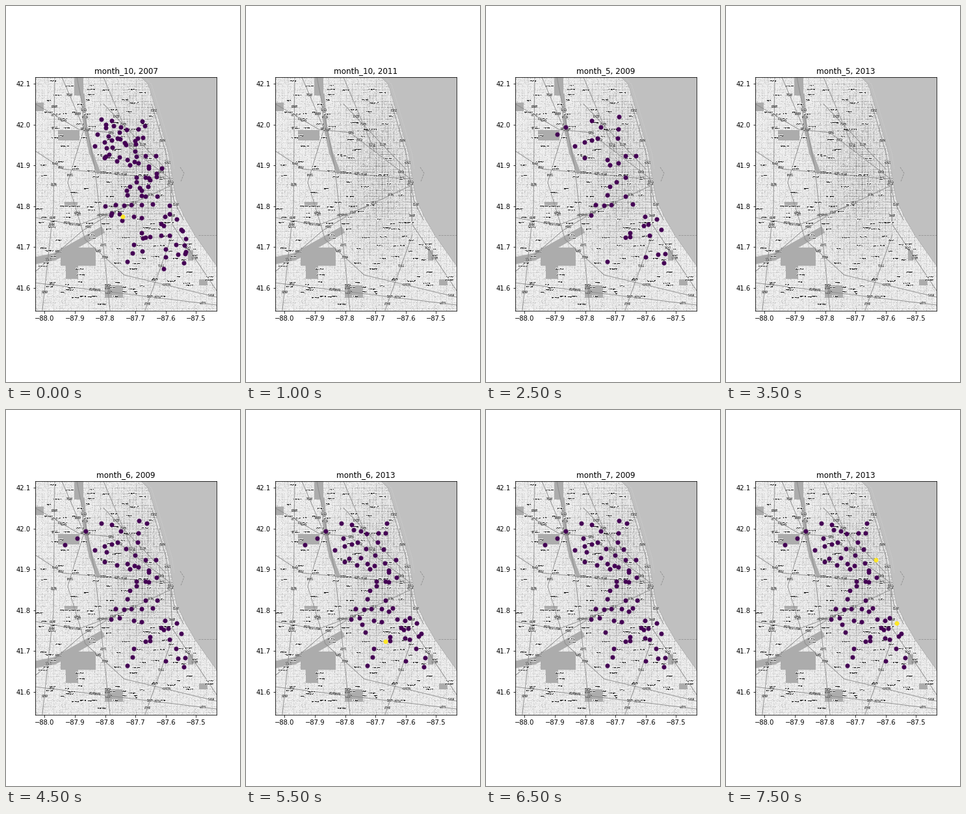
Write a matplotlib script that moves like this. It is 360 by 576 pixels and loops after 8 s.

```python
import numpy as np
import matplotlib.pyplot as plt
from matplotlib.animation import FuncAnimation
from matplotlib.patches import Polygon
from matplotlib.ticker import MultipleLocator

W, H, DPI = 360, 576, 72
LEFT, TOP, WIDE, TALL = 45, 109, 279, 357.6
WEST, EAST, SOUTH, NORTH = -88.031, -87.432, 41.544, 42.116
PURPLE, YELLOW = "#440154", "#fde725"
YEARS = (2007, 2009, 2011, 2013)

# Trap sites in stage pixels, grouped by the survey that first lists them.
MAY_09 = [
    (205, 170), (204, 241), (215, 230), (265, 381), (152, 209), (231, 230),
    (222, 354), (187, 290), (201, 270), (182, 306), (163, 176), (177, 186),
    (204, 189), (203, 203), (172, 203), (163, 206), (137, 215), (152, 233),
    (187, 236), (191, 244), (215, 263), (191, 277), (215, 292), (169, 305),
    (193, 305), (226, 304), (162, 321), (245, 323), (263, 327), (243, 337),
    (270, 343), (252, 352), (215, 355), (246, 385), (276, 380), (187, 392),
    (274, 394), (123, 186), (110, 197), (250, 335), (222, 348)]
JUN_09 = [
    (155, 218), (233, 292), (147, 174), (220, 246), (220, 249), (220, 264),
    (185, 213), (199, 223), (171, 238), (198, 239), (232, 257), (201, 263),
    (209, 305), (175, 319), (197, 323), (209, 325), (239, 334), (197, 366),
    (195, 379), (262, 366), (217, 174), (91, 207)]
JUL_09 = [
    (150, 197), (212, 214), (177, 227), (220, 309), (184, 341), (245, 350)]
NEW_13 = [
    (166, 184), (186, 190), (159, 228), (179, 329), (252, 319),
    (215, 189), (214, 235), (233, 321), (266, 347)]
ONLY_07 = [
    (154, 182), (141, 197), (214, 184), (222, 267), (240, 249), (154, 231),
    (210, 376), (209, 348), (154, 187), (175, 194), (158, 200), (210, 177),
    (211, 202), (176, 204), (183, 210), (199, 207), (200, 212), (164, 217),
    (175, 232), (201, 231), (232, 262), (206, 279), (219, 277), (186, 283),
    (209, 283), (209, 291), (153, 307), (252, 306), (163, 318), (180, 323),
    (272, 345), (277, 357), (211, 356), (239, 352), (275, 367), (246, 373),
    (277, 377), (243, 403)]


def without(sites, gone):
    return [s for s in sites if s not in gone]


def within(sites, x_max, y_max):
    return [(x, y) for x, y in sites if x <= x_max and y <= y_max]


by_june = MAY_09 + JUN_09
by_july = by_june + JUL_09
gone_07 = MAY_09[:1] + MAY_09[-4:] + JUN_09[-2:] + JUL_09
all_07 = without(by_july, gone_07) + NEW_13[:5] + ONLY_07
all_11 = without(by_july, MAY_09[:4] + JUN_09[:2])
all_13 = all_11 + NEW_13
first_07 = ONLY_07[:8] + MAY_09[4:10] + JUN_09[2:6]
june_07 = [s for i, s in enumerate(within(all_07, 246, 392)) if i % 4 != 2]

# Sites per month, one list for each year.
SURVEYS = {
    10: (all_07, within(by_july, 265, 385), [], []),
    5: (first_07, MAY_09, [], []),
    6: (june_07, by_june, all_11, all_13),
    7: (without(all_07, ONLY_07[::6]), by_july, all_11 + NEW_13[::2], all_13),
}
POSITIVE = {
    (10, 2007): [(180, 323)],
    (6, 2013): [(215, 355)],
    (7, 2013): [(231, 230), (263, 327)],
}
SCENES = [(month, year) for month in SURVEYS for year in YEARS]

SHORE = [
    (208, 109), (219, 120), (228, 150), (237, 180), (250, 225), (254, 250),
    (262, 297), (277, 328), (292, 353), (308, 376), (324, 398)]
PARKS = [  # x, y, width, height
    (105, 109, 14, 28), (80, 190, 33, 16), (45, 148, 13, 13),
    (90, 300, 20, 7), (84, 370, 54, 28), (92, 398, 19, 20),
    (152, 428, 28, 19), (280, 373, 8, 17), (297, 419, 13, 9)]
VALLEY = [(118, 137), (122, 185), (131, 225), (142, 254)]
CANAL = [(45, 390), (75, 384), (145, 345)]
ROADS = [
    [(45, 150), (112, 189), (160, 194), (252, 264)],
    [(252, 276), (165, 316), (118, 344), (45, 407)],
    [(252, 262), (256, 335), (324, 436)],
    [(86, 109), (120, 188), (95, 270), (122, 358), (182, 412), (324, 446)],
    [(45, 222), (88, 250), (252, 265)],
    [(150, 109), (198, 223)],
    [(75, 109), (73, 310), (56, 466)],
    [(45, 424), (324, 458)],
    [(256, 350), (214, 466)],
    [(109, 109), (137, 250), (160, 466)],
    [(45, 324), (110, 336), (200, 302)],
    [(150, 150), (246, 250)],
    [(x - 4, y) for x, y in SHORE[2:8]],
]


def geo(points):
    x, y = np.asarray(points, float).reshape(-1, 2).T
    return np.column_stack([WEST + (x - LEFT) / WIDE * (EAST - WEST),
                            NORTH - (y - TOP) / TALL * (NORTH - SOUTH)])


rng = np.random.default_rng(7)
ROWS, COLS = 358, 279
gy, gx = np.mgrid[TOP:TOP + ROWS, LEFT:LEFT + COLS]
city = np.exp(-((gx - 208) / 62) ** 2 - ((gy - 252) / 130) ** 2)
shore_x, shore_y = np.array(SHORE).T


def add_streets(land, step, drop):
    for grid, density in ((land, city), (land.T, city.T)):
        length, count = grid.shape
        for k in np.arange(1, count, step).astype(int):
            on = np.repeat(rng.random(length // 9 + 1) < 0.72, 9)[:length]
            grid[:, k] -= drop * on * (0.35 + 0.75 * density[:, k])


def make_land():
    land = 0.925 - 0.07 * city + rng.normal(0, 0.022, city.shape)
    add_streets(land, 4.53, 0.09)
    add_streets(land, 9.06, 0.13)
    dots = rng.random(city.shape)
    land[dots < 0.07] -= 0.14
    land[dots > 0.93] = 0.95
    return land.clip(0, 1)


def stamp(layer, x, y, tile):
    """Centre a small tile of greys on a stage pixel."""
    h, w = tile.shape
    r, c = int(y) - TOP - h // 2, int(x) - LEFT - w // 2
    if 0 <= r <= ROWS - h and 0 <= c <= COLS - w:
        layer[r:r + h, c:c + w] = tile


def make_labels():
    layer = np.full(city.shape, np.nan)
    for road in ROADS:
        for (x0, y0), (x1, y1) in zip(road, road[1:]):
            for t in rng.random(1 + int(np.hypot(x1 - x0, y1 - y0) / 50)):
                tile = np.where(rng.random((4, 9)) < 0.62, 0.45, 0.75)
                stamp(layer, x0 + t * (x1 - x0), y0 + t * (y1 - y0), tile)
    for _ in range(190):
        x, y = rng.uniform(50, 320), rng.uniform(112, 462)
        if x > np.interp(y, shore_y, shore_x) - 6:
            continue
        tile = np.full((3, rng.integers(6, 14)), 0.93)
        tile[1] = np.where(rng.random(tile.shape[1]) < 0.65, 0.08, 0.8)
        tile[2] = np.where(rng.random(tile.shape[1]) < 0.3, 0.3, 0.9)
        stamp(layer, x, y, tile)
    return np.ma.masked_invalid(layer)


def draw_map(ax):
    box = dict(extent=(WEST, EAST, SOUTH, NORTH), cmap="gray", vmin=0, vmax=1,
               aspect="auto", interpolation="nearest")
    ax.imshow(make_land(), **box)
    for x, y, w, h in PARKS:
        corners = [(x, y), (x + w, y), (x + w, y + h), (x, y + h)]
        ax.add_patch(Polygon(geo(corners), color="#acacac", lw=0))
    for strip, width in ((VALLEY, 6), (CANAL, 11)):
        ax.plot(*geo(strip).T, color="#acacac", lw=width, zorder=1)
    lake = SHORE + [(325, 398), (325, 108), SHORE[0]]
    ax.add_patch(Polygon(geo(lake), fc="#c0c0c0", ec="#a4a4a4", lw=0.6))
    for road in ROADS:
        ax.plot(*geo(road).T, color="#8c8c8c", lw=0.9)
    coast = [(x + 5, y) for x, y in SHORE[:6]]
    ax.plot(*geo(coast).T, color="#d8d8d8", lw=0.8, ls=":")
    pier = [(268, 247), (274, 256), (269, 269)]
    ax.plot(*geo(pier).T, color="#8c8c8c", lw=0.8, ls="--")
    ax.plot(*geo([(296, 351), (324, 351)]).T, color="#909090", lw=0.8, ls="--")
    ax.imshow(make_labels(), zorder=2.5, **box)
    ax.set(xlim=(WEST, EAST), ylim=(SOUTH, NORTH))
    for axis in (ax.xaxis, ax.yaxis):
        axis.set_major_locator(MultipleLocator(0.1))


fig = plt.figure(figsize=(W / DPI, H / DPI), dpi=DPI, facecolor="white")
ax = fig.add_axes([LEFT / W, 1 - (TOP + TALL) / H, WIDE / W, TALL / H])
draw_map(ax)
traps = ax.scatter([], [], zorder=3)
title = ax.set_title("")


def update(i):
    month, year = SCENES[i]
    positive = POSITIVE.get((month, year), [])
    sites = SURVEYS[month][YEARS.index(year)]
    sites = without(sites, positive) + positive
    traps.set_offsets(geo(sites))
    traps.set_color([YELLOW if s in positive else PURPLE for s in sites])
    title.set_text(f"month_{month}, {year}")
    return traps, title


anim = FuncAnimation(fig, update, frames=len(SCENES), interval=500,
                     repeat=True, repeat_delay=0)
plt.show()
```
